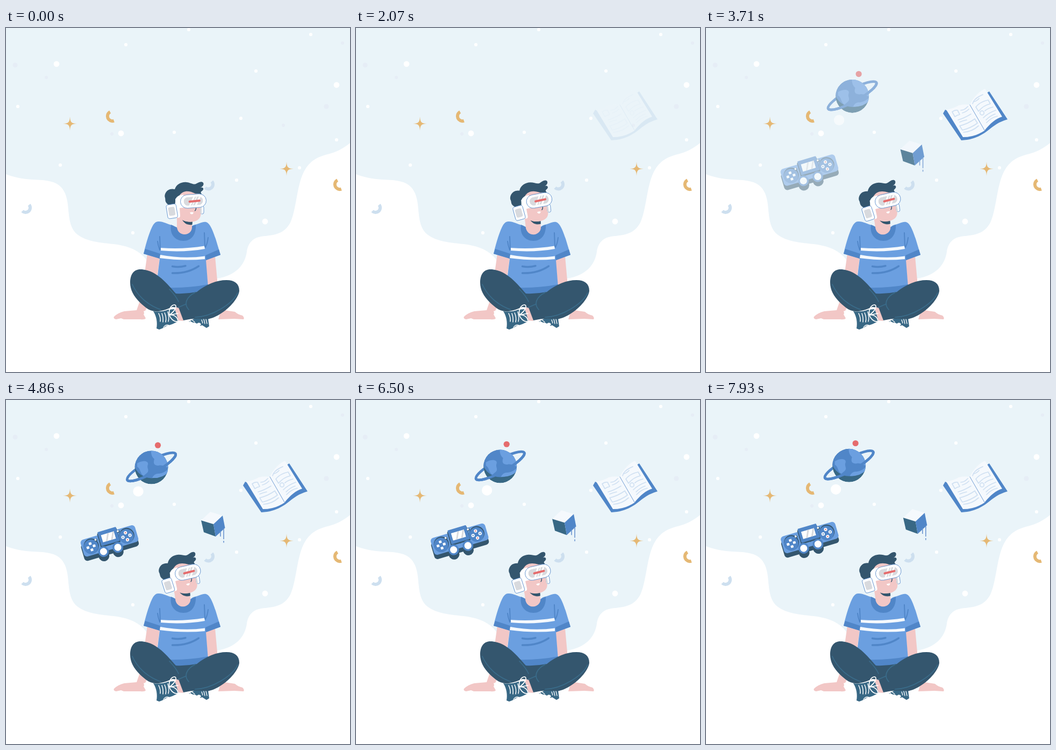
Recreate the animation shown at these times as an HTML page. Size 640x640 px, loop 8000 ms.

```html
<!DOCTYPE html>
<html lang="en">
<head>
<meta charset="utf-8">
<title>Headset daydream</title>
<style>
html, body { margin: 0; width: 100%; height: 100%; overflow: hidden; background: #fff; }
svg { display: block; width: 100%; height: 100%; }
.white { fill: #fff; }
.navy { fill: #34566e; }
.teal { fill: #386885; }
.blue { fill: #6b9fe0; }
.deep { fill: #5086c8; }
.skin { fill: #f2c7c6; }
.gold { fill: #e5b874; }
.red { fill: #e56c6d; }
.grey { fill: #d8dade; }
.faint { fill: #e6edf6; }
.page { fill: #f5f9fd; }
.line { fill: none; stroke-linecap: round; stroke-linejoin: round; }
.butt { fill: none; stroke-linecap: butt; }
.ln-deep { stroke: #5086c8; }
.ln-teal { stroke: #3a6c8a; }
.ln-white { stroke: #fff; }
.ln-page { stroke: #cfe0f2; }
.edge { fill: #fff; stroke: #5086c8; stroke-width: .8; }
</style>
</head>
<body>
<svg viewBox="0 0 640 640">
  <defs>
    <path id="spark" class="gold" d="M0-13C.6-2.500 2.500-.6 13 0C2.500 .6 .6 2.500 0 13C-.6 2.500-2.500 .6-13 0C-2.500-.6-.6-2.500 0-13Z"/>
    <path id="arcGold" class="butt" stroke="#e5b874" stroke-width="6" d="M2.800 8.600A9 9 0 0 1-4.300-7.900"/>
    <path id="arcPale" class="butt" stroke="#cddfef" stroke-width="6" d="M6-6A8.500 8.500 0 0 1-6.500 5.500"/>
    <clipPath id="globe"><circle cx="270.500" cy="125.500" r="31"/></clipPath>
    <clipPath id="lens"><rect x="-18" y="-8" width="36" height="16" rx="8"/></clipPath>
    <clipPath id="screen"><rect x="-11.500" y="-15.500" width="25" height="14"/></clipPath>
  </defs>

  <path fill="#eaf4f9" d="M0 0H640V214C625 226 614 231 598 235C570 242 557 256 549 280C540 308 539 340 529 362C518 383 500 385 483 387C462 388 451 397 448 416C445 440 428 461 392 466C340 475 290 470 263 434C250 413 225 405 200 402C170 399 140 396 126 377C112 355 120 325 108 304C98 284 75 283 50 282C30 281 12 277 0 272Z"/>
  <g id="dots"></g>
  <use href="#spark" x="119" y="178"/>
  <use href="#spark" x="522" y="262"/>
  <use href="#arcGold" x="198" y="164"/>
  <use href="#arcGold" x="621" y="291"/>
  <use href="#arcPale" x="37" y="335"/>
  <use href="#arcPale" x="377" y="291.500"/>

  <g id="book">
    <path class="deep" d="M445 152L441 159L475 209C505 208 520 194 533 184Q546 174 561 170L527 118L522 121L518 185Z"/>
    <path class="page" d="M447 152Q460 150 470 144Q480 141 491 143C496 130 508 118 519 113L551 165C540 168 528 178 518 191Q500 203 478 203Z"/>
    <path class="line ln-deep" stroke-width=".8" d="M491 143L518 190"/>
    <g class="line ln-page" stroke-width="1.700">
      <path d="M458 156Q463 152 468 153L472 161Q467 162 463 165Z"/>
      <path d="M474 153Q481 153 487 146M477 158Q484 156 489 151M469 171Q480 168 493 160M472 175Q479 172 485 171"/>
      <path d="M472 182Q488 178 500 169L505 177Q493 186 477 190ZM479 194Q495 193 507 182"/>
      <path d="M496 141Q498 131 515 124M499 137Q505 135 508 131"/>
      <path d="M502 147Q510 137 525 134L529 141Q516 144 507 155Z"/>
      <circle cx="513.500" cy="158" r="3.800"/>
      <path d="M519 154Q525 149 534 147M516 167Q525 158 539 153M521 171Q529 163 538 160M522 176Q530 167 542 164"/>
    </g>
  </g>

  <g id="planet">
    <ellipse class="line ln-deep" stroke-width="4.800" cx="270.500" cy="124.500" rx="51" ry="11.500" transform="rotate(-28.500 270.500 124.500)"/>
    <g clip-path="url(#globe)">
      <circle class="teal" cx="270.500" cy="125.500" r="31"/>
      <circle class="deep" cx="271" cy="111" r="34.500"/>
      <g class="blue">
        <path d="M244 118C252 112 266 112 264 120C261 127 268 130 262 136L256 141C249 137 251 128 244 124Z"/>
        <path d="M270 93C285 92 299 102 303 115V126C296 125 292 120 284 122C274 122 274 116 276 110Q269 104 270 93Z"/>
        <path d="M272 145Q276 136 285 137Q297 135 303 126V133Q292 146 272 145Z"/>
      </g>
    </g>
    <path class="line ln-deep" stroke-width="4.800" transform="rotate(-28.500 270.500 124.500)" d="M321.500 124.500A51 11.500 0 0 1 219.500 124.500"/>
    <circle class="red" cx="282.500" cy="84.200" r="5.600"/>
    <circle class="white" cx="246" cy="170" r="9.600"/>
  </g>

  <g id="cube">
    <path class="page" d="M363 224L380 208L403 215L386 231Z"/>
    <path class="teal" d="M363 224L386 231L390 254L368 246Z"/>
    <path class="deep" d="M386 231L403 215L407.500 238L390 254Z"/>
    <path class="butt" stroke="#6c95d0" stroke-width="1.600" d="M399 244V254M405 239V259M405 262V265.500"/>
  </g>

  <g id="pad">
    <g transform="translate(192 263) rotate(-16.500)">
      <g class="navy" transform="translate(-1.500 8)">
        <rect x="-52" y="-17" width="105.500" height="32.500" rx="6"/>
        <circle cx="-15.500" cy="15.200" r="10"/>
        <circle cx="12.200" cy="15.200" r="10"/>
      </g>
      <rect class="blue" x="-52" y="-17" width="105.500" height="32.500" rx="6"/>
      <rect class="navy" x="-18" y="-20" width="38" height="27" rx="1.500"/>
      <rect class="deep" x="-16.500" y="-22.500" width="36" height="27" rx="1.500"/>
      <g clip-path="url(#screen)">
        <rect class="white" x="-12" y="-16" width="26" height="15"/>
        <path stroke="#d8dade" stroke-width="3" d="M-5 0L3-17M5 0L13-17"/>
      </g>
      <g id="keys"></g>
    </g>
  </g>

  <g id="body">
    <path class="skin" d="M263 420L286 427L281 465L262 520L256 533L260 540Q258 543 250 542L219 542L214 540L205 542Q199 541 201 537Q208 530 220 527L243 525L250 505L258 455Z"/>
    <path class="skin" d="M371 430L389 425L394 480L376 484Z"/>
    <path class="skin" d="M400 524L426 528Q431 533 440 535Q444 539 442 542L425 541L395 542Z"/>
    <path class="blue" d="M283 360C291 359 300 365 310 367Q332 380 348 367C358 365 365 360 372 361C380 363 385 378 390 392L399 422L372 432L376 482L340 496L281 495V468L286 429L256 420C261 398 268 376 274 366Q278 360 283 360Z"/>
    <g class="deep">
      <path d="M259 411L287 420L286 429L256 420Z"/>
      <path d="M371 423L396 412L399 422L372 432Z"/>
      <path d="M307 366C304 384 315 396 330 396C346 396 354 383 353 366L346 369Q332 380 317 371Z"/>
      <path d="M300 483Q340 484 376 477V483L350 493L316 496Z"/>
    </g>
    <path class="page" d="M288 409Q330 412 369 405.500L370 411Q330 418 287 414Z"/>
    <path class="page" d="M287 422Q330 430 370 424.500V430Q330 434 286 428Z"/>
    <path class="line ln-deep" stroke-width="2" d="M282 397Q283 405 286 413M286 388L287 413M369 381L370 406M376 390Q375 400 371 408"/>
    <path class="line ln-deep" stroke-width="3.400" d="M309.500 443.500Q322 446 334 442.500M309.500 456Q338 457 358.500 443"/>

    <path class="skin" d="M314 520L323 520L330 545L320 544Z"/>
    <path class="teal" d="M274 527Q290 529 302 524L314 523L321 545C314 549 310 551 303 553C298 553 295 558 285 561L280 559C282 548 280 536 274 527Z"/>
    <path class="teal" d="M340 546L352 540H376L378 555L373 558L365 553Q356 556 353 549Z"/>
    <path class="white" d="M344 551Q350 546 355 550Q360 546 363 551Q360 557 353 556Z"/>
    <path class="navy" d="M250 449C279 449 300 476 316 494Q335 495 355 491C372 477 392 469 410 469C426 469 434 476 434 489C432 508 400 538 374 542Q352 538 330 544L321 520L309 519Q300 524 284 527C275 528 266 525 260 520C242 506 231 491 231 474C231 458 238 449 250 449Z"/>
    <path class="line ln-teal" stroke-width="1.700" d="M235 477C244 497 262 515 288 524M304 486Q316 498 321 509M352 492C336 500 330 513 340 524M320 520L334 514M352 538C385 537 422 512 431 493"/>
    <path class="white" d="M256 527C266 523 276 530 278 540Q279 548 276 552L261 541Z"/>
    <path class="line ln-white" stroke-width="1.500" d="M284 531Q288 539 287 546M290 531Q293 539 292 547M295 530Q299 538 297 547M301 528Q304 538 302 546"/>
    <path class="line ln-white" stroke-width="1.700" d="M304 534C302 522 308 515 314 515C319 517 315 526 304 534C313 532 320 539 320 546C314 547 307 543 304 534L320 531"/>
    <path class="line ln-white" stroke-width="1.300" d="M293 557Q297 551 303 553M342 545L348 550M346 543L351 547M364 543L366 549M368 542L370 550M372 542L374 550"/>
  </g>

  <g id="head">
    <path class="skin" d="M318 345V371C319 379 325 384 332 384C340 384 346 378 346 371V345Z"/>
    <path class="navy" d="M328 357C334 361 340 361 347 360L346.500 366C338 367 332 364 328 357Z"/>
    <path class="skin" d="M322 314C321 330 319 350 330 357C341 364 360 361 362 349L365 334C366 318 356 303 340 303C330 303 324 307 322 314Z"/>
    <path class="navy" d="M301 328C295 323 297 320 296 316C294 311 297 305 301 302C305 299 310 299 314 300C317 291 326 286 336 287C345 288 349 293 355 289C360 286 365 285 367 288C369 292 365 296 361 297C366 295 369 299 366 302C363 305 361 304 364 309L352 308C340 302 330 302 323 311L315 318V332L303 330Z"/>
    <rect x="361.500" y="331" width="6.500" height="15" rx="3" class="edge"/>
    <path class="grey" d="M361 333H364V346L361 345Z"/>
    <path class="line" stroke="#34566e" stroke-width="1.300" d="M353.500 334Q354 338 351.500 340"/>
    <path class="white" d="M342 343.500Q345 342 349 343Q348 346.500 345.500 346.500Q343 346 342 343.500Z"/>
    <path class="white" d="M330 310Q318 311 316 318L314 330L319 353Q324 354 324 349L323 335L332 334Z"/>
    <g transform="translate(308.700 341) rotate(-9)">
      <rect class="edge" x="-9.300" y="-13" width="18.600" height="26" rx="4"/>
      <rect class="grey" x="-6.300" y="-8" width="12" height="16" rx="3"/>
    </g>
    <g transform="translate(348.500 322) rotate(-4)">
      <rect class="edge" x="-24" y="-12.500" width="48" height="25" rx="12.500"/>
      <g clip-path="url(#lens)">
        <rect class="grey" x="-18" y="-8" width="36" height="16"/>
        <path class="ln-white" stroke-width="3" d="M-8 10L3-10M3 10L14-10"/>
        <path class="ln-white" stroke-width="1.500" d="M-3 10L8-10"/>
      </g>
      <path class="line" stroke="#e56c6d" stroke-width="4" d="M-7 .6L11.500 0"/>
    </g>
  </g>
</svg>
<script>
const LOOP = 8000;
const $ = id => document.getElementById(id);
const clamp = v => Math.min(1, Math.max(0, v));
const ramp = (t, from, span) => clamp((t - from) / span);
const ease = p => (1 - Math.cos(Math.PI * p)) / 2;

const circle = (x, y, r, cls) => `<circle class="${cls}" cx="${x}" cy="${y}" r="${r}"/>`;

function buildDots() {
  const small = [[223, 31], [340, 3], [567, 12], [465, 80], [22, 146], [313, 194], [437, 168],
    [615, 208], [546, 260], [429, 283], [236, 381], [101, 255]];
  const large = [[94, 67], [615, 106], [214, 196], [482, 360]];
  const faint = [[17, 69, 4.5], [75, 92, 3], [197, 197, 3], [516, 181, 3], [596, 146, 4.5], [626, 28, 3]];
  $('dots').innerHTML =
    small.map(([x, y]) => circle(x, y, 3.1, 'white')).join('') +
    large.map(([x, y]) => circle(x, y, 5.4, 'white')).join('') +
    faint.map(([x, y, r]) => circle(x, y, r, 'faint')).join('');
}

function buildKeys() {
  const sides = [[0, -1], [1, 0], [0, 1], [-1, 0]];
  let out = '';
  for (const x of [-35.2, 33.5]) out += circle(x + .8, -1.2, 14.2, 'navy') + circle(x, 0, 13.6, 'deep');
  for (const [a, b] of sides) {
    out += `<rect class="white" x="${-37.7 + a * 6}" y="${-2.3 + b * 6}" width="5" height="4.6" rx=".8"/>`;
    const x = 33.5 + a * 6.8, y = b * 6.8;
    out += circle(x, y, 3.1, 'white') + circle(x, y, 1.2, a ? 'deep' : 'red');
  }
  for (const x of [-15.5, 12.2]) out += circle(x, 15.2, 10, 'deep') + circle(x, 15.2, 6.6, 'white');
  for (const [x, y] of [[-23.6, -10.1], [20.7, -13.7]]) out += circle(x + .6, y + .6, 2.6, 'navy') + circle(x, y, 1.9, 'white');
  $('keys').innerHTML = out + circle(.5, 6.5, .9, 'navy');
}

// Fade-in start in ms, drift in pixels per second around the base time.
const FADE = 1400, BASE = 4860;
const floats = {
  book: { from: 1930, vx: 0, vy: 0 },
  cube: { from: 2610, vx: 1.25, vy: -1.6 },
  planet: { from: 2870, vx: -1.42, vy: -1.2 },
  pad: { from: 3070, vx: .1, vy: -2 },
};

function render(t) {
  const tilt = ease(ramp(t, 720, 2020)) - ease(ramp(t, 7540, 2020));
  $('head').setAttribute('transform', `rotate(${-8.6 * tilt} 333 389)`);
  const s = (t - BASE) / 1000;
  for (const [id, { from, vx, vy }] of Object.entries(floats)) {
    $(id).setAttribute('opacity', ramp(t, from, FADE));
    $(id).setAttribute('transform', `translate(${vx * s} ${vy * s})`);
  }
}

buildDots();
buildKeys();
const start = performance.now();
function tick() {
  render((performance.now() - start) % LOOP);
  requestAnimationFrame(tick);
}
tick();
</script>
</body>
</html>
```
